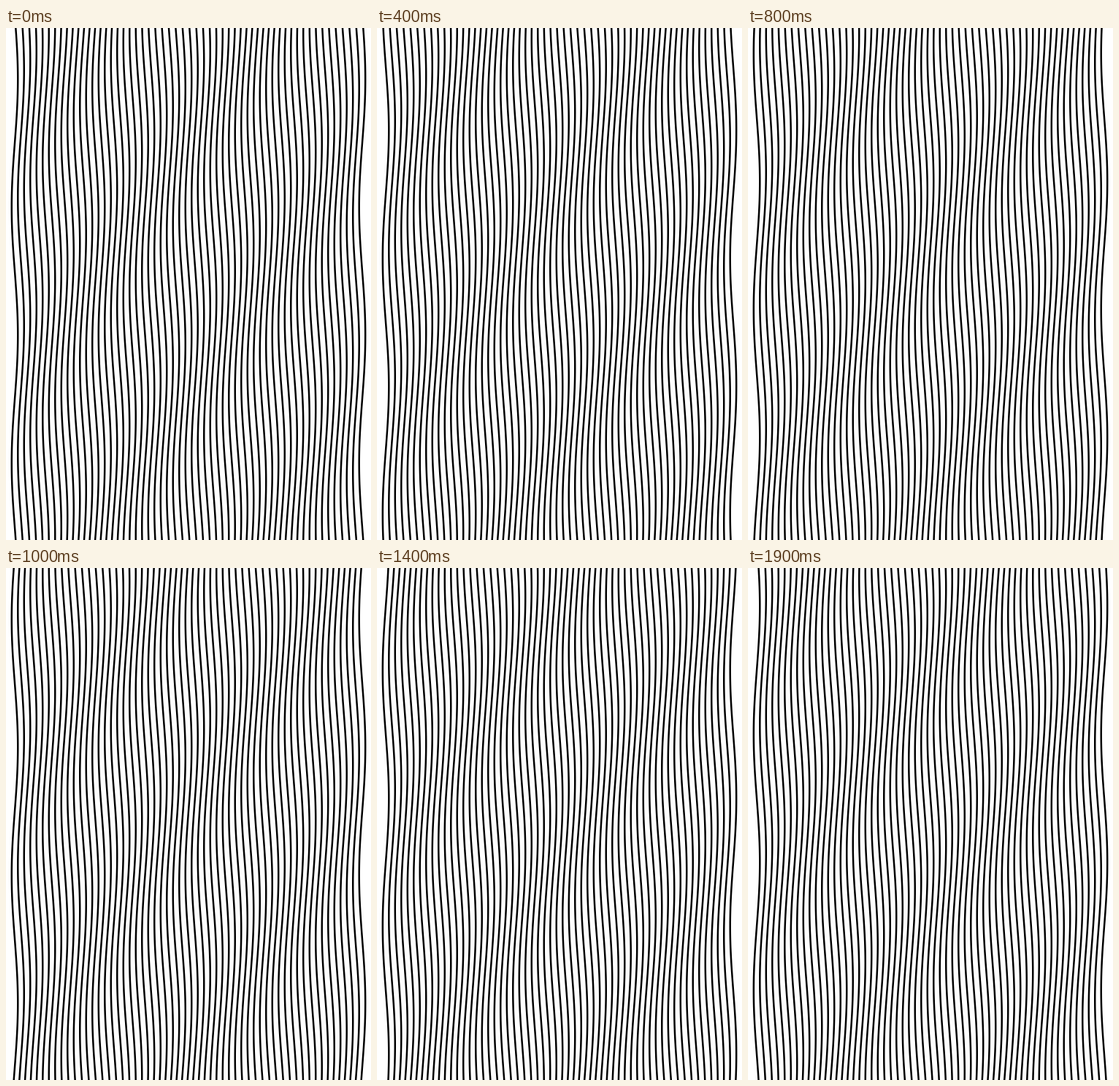
Write an HTML page with a canvas that moves like this. It is 500 px wide and 700 px high and loops after 2000 ms.

```html
<!DOCTYPE html>
<html lang="en">
<head>
<meta charset="utf-8">
<title>Waving lines</title>
<style>
  html, body { margin: 0; width: 100%; height: 100%; overflow: hidden; background: #fff; }
  canvas { display: block; width: 500px; height: 700px; }
</style>
</head>
<body>
<canvas width="500" height="700"></canvas>
<script>
const WIDTH = 500, HEIGHT = 700;
const LOOP = 2000, STEP = 100;
const MARGIN = 12, GAPS = 56;
const SPACING = (WIDTH - 2 * MARGIN) / GAPS;
const AMPLITUDE = SPACING / 2;
const WAVELENGTH = HEIGHT / 2;
const FIRST_CREST = 70;
const TAU = 2 * Math.PI;

const ctx = document.querySelector("canvas").getContext("2d");
ctx.lineWidth = 2.5;

// Crests slant down to the left and travel one wavelength down per loop.
function lineX(index, y, progress) {
  const cycles = (y - FIRST_CREST) / WAVELENGTH + 2 * index / GAPS - progress;
  return MARGIN + index * SPACING + AMPLITUDE * Math.cos(TAU * cycles);
}

function draw(progress) {
  ctx.fillStyle = "#fff";
  ctx.fillRect(0, 0, WIDTH, HEIGHT);
  ctx.beginPath();
  for (let i = 0; i <= GAPS; i++) {
    ctx.moveTo(lineX(i, -5, progress), -5);
    for (let y = 0; y <= HEIGHT + 5; y += 5) ctx.lineTo(lineX(i, y, progress), y);
  }
  ctx.stroke();
}

function tick() {
  const time = performance.now() % LOOP;
  draw(Math.floor(time / STEP) * STEP / LOOP);
  requestAnimationFrame(tick);
}
tick();
</script>
</body>
</html>
```
